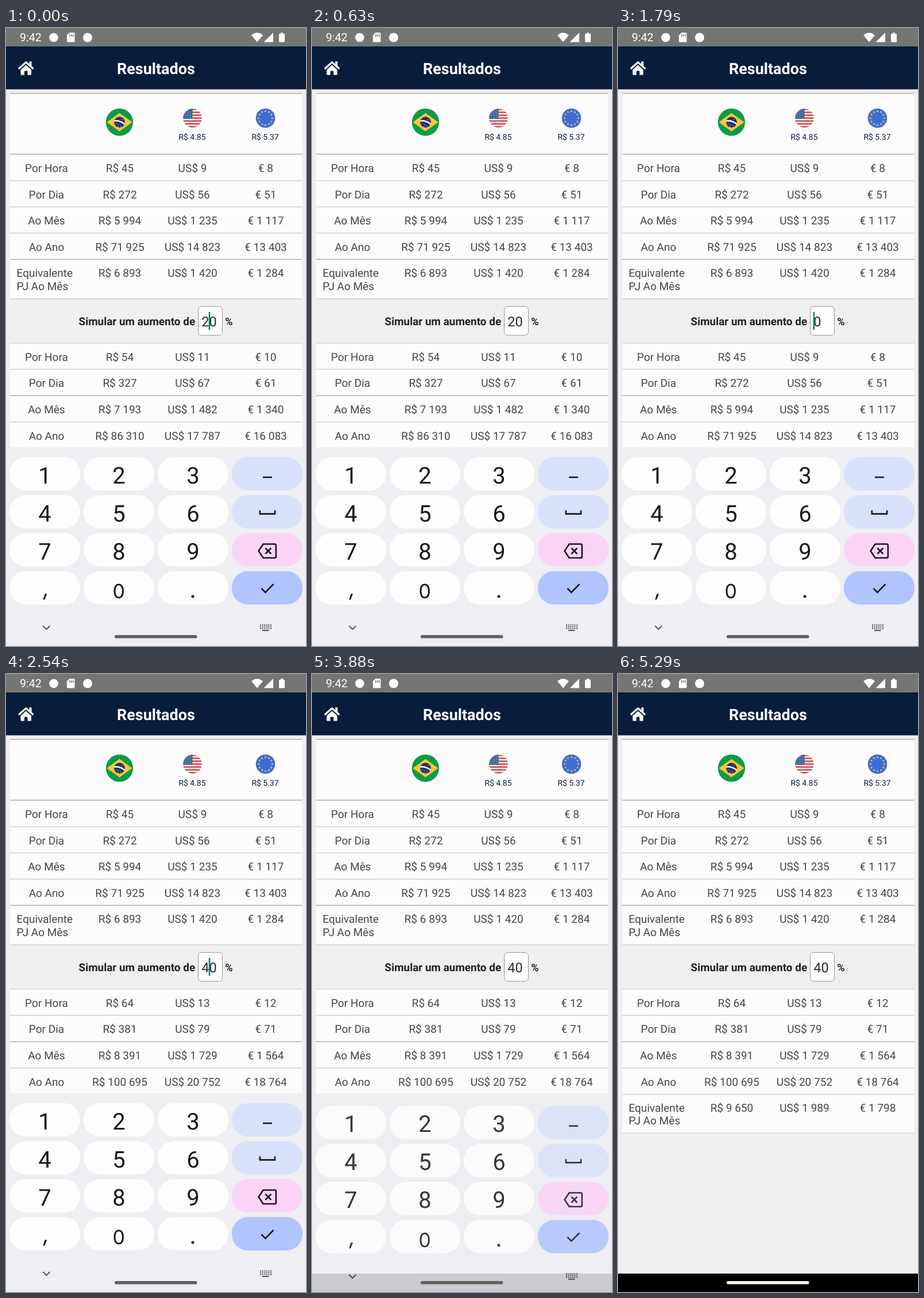
An HTML page for the animation above (5.37 s loop, 522 by 1073 pixels).

```html
<!DOCTYPE html>
<html lang="pt-BR">
<head>
<meta charset="utf-8">
<title>Resultados</title>
<style>
  html, body { margin: 0; width: 100%; height: 100%; overflow: hidden; background: #efeff0; }
  svg { display: block; width: 100vw; height: 100vh; }
  text { font-family: Roboto, "Noto Sans", sans-serif; text-rendering: geometricPrecision; }
  .cell { font-size: 19.05px; fill: #464646; }
  .mid { text-anchor: middle; }
  .bold { font-weight: 700; }
  .rate { font-size: 13.9px; fill: #081c3c; }
  .digit { font-size: 40px; fill: #18181f; }
  .icon { fill: none; stroke: #18181f; stroke-width: 2.6; }
</style>
</head>
<body>
<svg id="stage" viewBox="0 0 522 1073" preserveAspectRatio="none">
  <defs>
    <clipPath id="usClip"><circle cx="324.5" cy="156.5" r="16.3"/></clipPath>
    <clipPath id="globe"><circle cx="197.5" cy="163.5" r="9.6"/></clipPath>
  </defs>
  <rect width="522" height="1073" fill="#efeff0"/>

  <!-- Status bar -->
  <rect width="522" height="32" fill="#757573"/>
  <g fill="#fff">
    <text x="24" y="23.4" font-size="19.6">9:42</text>
    <circle cx="83" cy="16.5" r="7.8"/>
    <path d="M110.500 8H118q1.500 0 1.500 1.500V23q0 1.500-1.500 1.500H107.500q-1.500 0-1.500-1.500V12.500Z"/>
    <path d="M111 11v4M114 11v4M117 11v4" stroke="#757573" stroke-width="1.500"/>
    <circle cx="142" cy="16.500" r="8"/>
    <path d="M427 12.500Q437 4 447 12.500L437 24.500Z"/>
    <path d="M448.500 24.500H465V8Z"/>
    <path d="M478 8h4v2h2q1 0 1 1v12.500q0 1-1 1h-8q-1 0-1-1V11q0-1 1-1h2Z"/>
  </g>

  <!-- App bar -->
  <rect y="32" width="522" height="74.500" fill="#081c3c"/>
  <path d="M23 70L34.800 59.500L46.600 70" fill="none" stroke="#fff" stroke-width="3.200" stroke-linecap="round" stroke-linejoin="round"/>
  <path d="M40.500 58h4v8l-4-3.500ZM34.800 64.300L44 72.500V80q0 1.500-1.500 1.500H37.500V74.500H32V81.500H27q-1.500 0-1.500-1.500V72.500Z" fill="#fff"/>
  <text class="mid bold" x="261" y="80" font-size="27" fill="#fff">Resultados</text>

  <!-- Tables -->
  <rect x="7" y="113" width="508.500" height="357" fill="#fcfcfc"/>
  <rect id="sheet" x="7" y="547" width="508.500" height="181" fill="#fcfcfc"/>
  <g id="table"></g>

  <!-- Flags -->
  <circle cx="197.500" cy="163.500" r="23.700" fill="#0c9b4b"/>
  <path d="M175.500 163.500L197.500 147.500L219.500 163.500L197.500 179.500Z" fill="#fbc632"/>
  <g clip-path="url(#globe)">
    <circle cx="197.500" cy="163.500" r="9.600" fill="#29306f"/>
    <path d="M187 161.500Q198 159 208 168" fill="none" stroke="#fff" stroke-width="2.500"/>
    <path d="M191 166h1.500M195 168h1.500M199 170h1.500M194 171h1.500M201 159h1.500" stroke="#cdd0ea" stroke-width="1.200"/>
  </g>
  <g id="us" clip-path="url(#usClip)"></g>
  <circle cx="451.500" cy="156.500" r="16.800" fill="#3c6dd6"/>
  <g id="stars" fill="#f8c740"></g>
  <text class="rate mid" x="324" y="194">R$ 4.85</text>
  <text class="rate mid" x="451" y="194">R$ 5.37</text>

  <!-- Raise input -->
  <text class="bold" x="126.500" y="516" font-size="18.950" fill="#222">Simular um aumento de</text>
  <rect x="334.500" y="483.500" width="42" height="50" rx="6" fill="#fdfdfd" stroke="#96969a"/>
  <text id="raise" x="340.200" y="517.600" font-size="23.500" fill="#2b2b2b"></text>
  <rect id="caret" y="493" width="2.600" height="31" fill="#0b8273"/>
  <text class="bold" x="381.300" y="516" font-size="18" fill="#222">%</text>

  <!-- Navigation bar and keyboard -->
  <rect y="1041" width="522" height="32" fill="#000"/>
  <g id="keyboard">
    <rect y="733.500" width="522" height="340" fill="#eeeef3"/>
    <g id="keys"></g>
    <path d="M67.500 982.500h3.700l-4 10h-2.700Z" fill="#18181f"/>
    <circle cx="325" cy="987" r="2.500" fill="#18181f"/>
    <path class="icon" d="M447 780H463"/>
    <path class="icon" d="M441.800 837.500V843.600H468V837.500"/>
    <path class="icon" d="M447.500 896H467.500Q469.800 896 469.800 898.300V917.700Q469.800 920 467.500 920H447.500L439.500 908ZM451.300 903L461.300 913M461.300 903L451.300 913"/>
    <path class="icon" d="M444.500 973L451.300 979.800L465.500 965.500"/>
    <path d="M64.500 1038L70.500 1044L76.500 1038" fill="none" stroke="#55555c" stroke-width="2"/>
    <g id="dots" fill="#55555c"><rect x="446" y="1045" width="11.500" height="2"/></g>
  </g>
  <rect id="pill" x="189" y="1054" width="143.500" height="5.600" rx="2.800"/>
</svg>
<script>
const LOOP = 5370;
const ERASE = 1600, TYPE = 2200, HIDE = 3860, HIDE_MS = 150, REVEAL = 3920;
const TINT = 3900, TINT_MS = 1500;

const $ = id => document.getElementById(id);
const clamp = v => Math.max(0, Math.min(1, v));

function add(parent, tag, attrs, text) {
  const el = document.createElementNS("http://www.w3.org/2000/svg", tag);
  for (const k in attrs) el.setAttribute(k, attrs[k]);
  if (text !== undefined) el.textContent = text;
  parent.appendChild(el);
  return el;
}

// Salary model: everything derives from the yearly amount.
const yearly = 71925;
const periods = [
  ["Por Hora", yearly / 12 / 22 / 6],
  ["Por Dia", yearly / 12 / 22],
  ["Ao Mês", yearly / 12],
  ["Ao Ano", yearly],
  ["Equivalente", 6892.6]
];
const currencies = [["R$", 1, 198], ["US$", 0.206087, 324.5], ["€", 0.186344, 452]];

const money = (sign, v) =>
  sign + " " + String(Math.round(v)).replace(/\B(?=(\d{3})+$)/g, " ");

const table = $("table");
const line = (parent, y, dark) =>
  add(parent, "rect", { x: 7, y: y - 0.5, width: 508.5, height: 1.1, fill: dark ? "#98989b" : "#c9c9ce" });

const extra = add(table, "g", {});
const raised = [];

function addRows(top, cells) {
  periods.forEach(([label, amount], i) => {
    const y = top + i * 45.6;
    const last = i === 4;
    const group = last && cells ? extra : table;
    if (last) {
      add(group, "text", { class: "cell", x: 18.5, y }, label);
      add(group, "text", { class: "cell", x: 18.5, y: y + 22.3 }, "PJ Ao Mês");
    } else {
      add(group, "text", { class: "cell mid", x: 70.5, y }, label);
    }
    for (const [sign, rate, x] of currencies) {
      const el = add(group, "text", { class: "cell mid", x, y }, money(sign, amount * rate));
      if (cells) cells.push({ el, sign, base: amount * rate });
    }
  });
}
addRows(250, null);
addRows(577.7, raised);
[113.5, 219, 265, 310.5, 356, 401.5, 470].forEach((y, i) => line(table, y, i < 2 || i === 5));
[547, 592.5, 638.3, 684].forEach((y, i) => line(table, y, i === 2));
[729.8, 797].forEach(y => line(extra, y));

// Flag details
const us = $("us");
for (let i = 0; i < 13; i++)
  add(us, "rect", { x: 308, y: 140.2 + i * 2.51, width: 33, height: 2.55, fill: i % 2 ? "#f7f1f1" : "#cf3b40" });
add(us, "rect", { x: 308, y: 140, width: 16.5, height: 17.7, fill: "#3c6799" });
for (let i = 0; i < 12; i++)
  add(us, "circle", { cx: 312 + i % 3 * 4.4, cy: 144 + Math.floor(i / 3) * 3.7, r: 0.6, fill: "#dce5f0" });

for (let i = 0; i < 12; i++) {
  const a = i * Math.PI / 6;
  const cx = 451.5 + 12 * Math.sin(a), cy = 156.5 - 12 * Math.cos(a);
  const points = Array.from({ length: 10 }, (_, k) => {
    const r = k % 2 ? 1 : 2.3, b = k * Math.PI / 5;
    return (cx + r * Math.sin(b)).toFixed(2) + "," + (cy - r * Math.cos(b)).toFixed(2);
  });
  add($("stars"), "polygon", { points: points.join(" ") });
}

// Keypad
const sideColors = ["#dae1fa", "#dae1fa", "#fbd4f5", "#b0c4fd"];
for (let row = 0; row < 4; row++)
  for (let col = 0; col < 4; col++) {
    const x = 6 + col * 129, y = 745 + row * 66;
    add($("keys"), "rect", { x, y, width: 123, height: 58, rx: 28, fill: col === 3 ? sideColors[row] : "#fdfdfd" });
    if (col < 3 && row < 3)
      add($("keys"), "text", { class: "digit mid", x: x + 61.5, y: y + 45.6 }, row * 3 + col + 1);
  }
add($("keys"), "text", { class: "mid", x: 196.3, y: 989.8, fill: "#18181f", style: "font: 400 34px Inter, Roboto, sans-serif" }, "0");
for (let i = 0; i < 18; i++)
  add($("dots"), "rect", { x: 442 + i % 6 * 3.6, y: 1035.5 + Math.floor(i / 6) * 3.1, width: 2, height: 2 });

let shown = null;
function setRaise(value) {
  if (value === shown) return;
  shown = value;
  $("raise").textContent = value;
  for (const { el, sign, base } of raised)
    el.textContent = money(sign, base * (1 + value / 100));
}

function caretOn(t) {
  if (t >= HIDE) return false;
  const start = t >= TYPE ? TYPE : t >= ERASE ? ERASE : -100;
  return (t - start) % 1000 < 500;
}

function render(t) {
  setRaise(t < ERASE ? "20" : t < TYPE ? "0" : "40");
  const erased = t >= ERASE && t < TYPE;
  $("caret").setAttribute("x", erased ? 339.6 : 352.7);
  $("caret").setAttribute("visibility", caretOn(t) ? "visible" : "hidden");

  const open = t >= REVEAL;
  extra.setAttribute("visibility", open ? "visible" : "hidden");
  $("sheet").setAttribute("height", open ? 250 : 181);

  const hide = clamp((t - HIDE) / HIDE_MS);
  $("keyboard").setAttribute("transform", `translate(0 ${34 * hide})`);
  $("keyboard").setAttribute("opacity", 1 - hide);

  const shade = Math.round(96 + 159 * clamp((t - TINT) / TINT_MS));
  $("pill").setAttribute("fill", `rgb(${shade},${shade},${shade})`);
}

const begin = performance.now();
function tick() {
  render((performance.now() - begin) % LOOP);
  requestAnimationFrame(tick);
}
tick();
</script>
</body>
</html>
```
